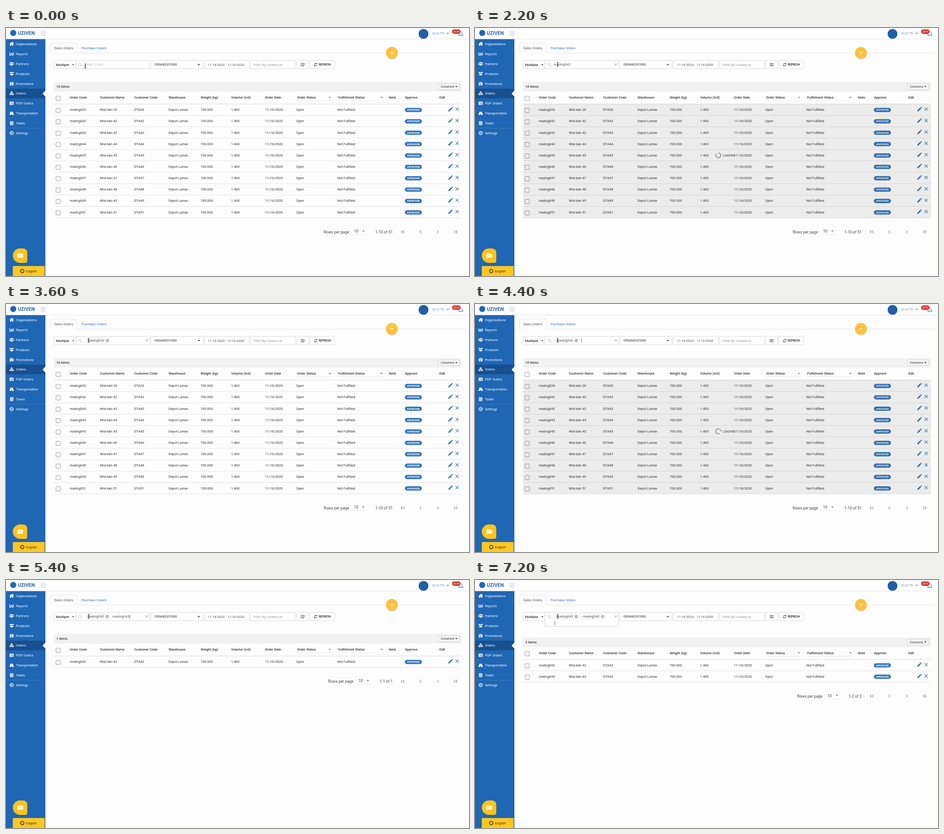
Animation of 1023 by 548 pixels, one loop 7400 ms. Source, as an HTML page:

```html
<!DOCTYPE html>
<html lang="en">
<head>
<meta charset="utf-8">
<title>Sales orders</title>
<style>
html, body { margin: 0; width: 100%; height: 100%; overflow: hidden; background: #fdfdfd; }
svg { display: block; width: 100%; height: 100%; }
text { font-family: Roboto, sans-serif; font-size: 7.46px; fill: #333; white-space: pre; }
</style>
</head>
<body>
<svg id="stage" viewBox="0 0 1023 548"></svg>
<script>
const LOOP = 7400, STEP = 200;
const BLUE = '#1f66b4', LINK = '#2f74b8', GREY = '#cfcfcf';
const stage = document.getElementById('stage');

const rect = (x, y, w, h, fill, extra = '') =>
  `<rect x="${x}" y="${y}" width="${w}" height="${h}" fill="${fill}" ${extra}/>`;
const box = (x, y, w, h, stroke = GREY, fill = '#fff', r = 1) =>
  rect(x, y, w, h, fill, `rx="${r}" stroke="${stroke}" stroke-width=".8"`);
const circle = (x, y, r, fill, extra = '') =>
  `<circle cx="${x}" cy="${y}" r="${r}" fill="${fill}" ${extra}/>`;
const line = (d, stroke, w = 1, extra = '') =>
  `<path d="${d}" fill="none" stroke="${stroke}" stroke-width="${w}" ${extra}/>`;
const shape = (d, fill) => `<path d="${d}" fill="${fill}"/>`;
const at = (x, y, body) => `<g transform="translate(${x} ${y})">${body}</g>`;
// y is the middle of the capital letters
const label = (x, y, s, { size = 7.46, weight = 400, fill = '#333', extra = '' } = {}) =>
  `<text x="${x}" y="${y + size * .36}" style="font-size:${size}px;font-weight:${weight};fill:${fill}" ${extra}>${s}</text>`;
const arrow = (x, y, fill = '#444') => shape(`M${x - 2.6} ${y - 1.3}h5.2l-2.6 2.7z`, fill);
const cross = (x, y, r, stroke, w) =>
  line(`M${x - r} ${y - r}l${2 * r} ${2 * r}M${x + r} ${y - r}l${-2 * r} ${2 * r}`, stroke, w);

const menu = [
  ['Organizations', shape('M-5 .4L0-4.2 5 .4 4.2 1.2 0-2.6-4.2 1.2zM-3.5 1L0-2 3.5 1V4.2H1V1.5H-1V4.2H-3.5zM2.3-4h1.4v3H2.3z', '#fff')],
  ['Reports', line('M-4.2-3.6V3.3H4.6', '#fff', 1.1) + line('M-2.2 2V-.3M-.2 2V-2.5M1.8 2V-1M3.8 2V-3.3', '#fff', 1.3)],
  ['Partners', circle(-3.2, -1.5, 1.3, '#fff') + circle(3.2, -1.5, 1.3, '#fff') + circle(0, -2, 1.8, '#fff') +
    shape('M-2.8 4V2Q-2.8.5 0 .5T2.8 2V4zM-5.4 2.2V1Q-5 0-3.1.2V2.2zM5.4 2.2V1Q5 0 3.1.2V2.2z', '#fff')],
  ['Products', shape('M-5-2.2L-3-4 0-2.8 3-4 5-2.2 2.6-.4 0-1.8-2.6-.4zM-3.7.6L-2.4 1 0-.6 2.4 1 3.7.6V2.6L0 4.3-3.7 2.6z', '#fff')],
  ['Promotions', shape('M-4.5-1.6H-.5V.8H-4.5zM.5-1.6H4.5V.8H.5zM-4 1.5H-.5V4.2H-4zM.5 1.5H4V4.2H.5z', '#fff') +
    line('M0-1.8C-4-2-2.5-5 0-2C2.5-5 4-2 0-1.8', '#fff', .9)],
  ['Orders', [[0, -2.2], [-2.5, 1.8], [2.5, 1.8]].map(([x, y]) =>
    shape(`M${x} ${y - 2.2}l2.2 1v2.3l-2.2 1.1-2.2-1.1v-2.3z`, '#fff') + line(`M${x - 1.6} ${y - .7}l1.6.7 1.6-.7M${x} ${y}v1.6`, '#17508f', .5)).join('')],
  ['PDP Orders', rect(-4.4, -3.6, 8.8, 7.2, '#fff', 'rx=".8"') +
    line('M-3-1.3h1M-1-1.3h4.3M-3 .4h1M-1 .4h4.3M-3 2.1h1M-1 2.1h4.3', BLUE, .8)],
  ['Transportation', shape('M-2.3-3.5H-.5V-1.8H.5V-3.5H2.3L5 3.6H.7V1.2H-.7V3.6H-5z', '#fff')],
  ['Tasks', rect(-3.8, -3.4, 7.6, 7.6, '#fff', 'rx=".8"') + line('M-2-4.6v2M2-4.6v2', '#fff', 1.1) +
    line('M-3.8-1.2h7.6', BLUE, .7) + line('M-2.6.6h5.2M-2.6 2.4h5.2', BLUE, 1.1, 'stroke-dasharray="1.2 .8"')],
  ['Settings', circle(0, 0, 3.4, 'none', 'stroke="#fff" stroke-width="1.1"') + circle(0, 0, 1.4, 'none', 'stroke="#fff" stroke-width=".9"') +
    circle(0, 0, 4.2, 'none', 'stroke="#fff" stroke-width="1" stroke-dasharray="1.6 1.7"')],
];

function sidebar() {
  return rect(0, 24, 87, 524, BLUE) + rect(0, 134, 87, 21.3, '#17508f') +
    shape('M87 138.5V151.5L80.7 145z', '#fdfdfd') + line('M0 221.3H87', '#4a86c8', .7) +
    menu.map(([name, icon], i) => {
      const y = 35 + i * 21.9;
      return at(12.5, y, icon) + label(22, y + .3, name, { fill: '#fff' });
    }).join('') +
    shape('M31 487C40 487 47 487 47 498V514Q47 519 42 519H31A16 16 0 0 1 31 487z', '#ffc31b') +
    shape('M26.5 498.2H36.5Q37.5 498.2 37.5 499.2V506.2Q37.5 507.2 36.5 507.2H28L25.5 509.7V499.2Q25.5 498.2 26.5 498.2z', '#fff') +
    line('M27.6 501h7.8M27.6 503.5h5.6', '#ffc31b', .9) +
    rect(15, 526, 70.5, 22, '#ffc71f') + circle(36, 537, 3.7, 'none', 'stroke="#222" stroke-width="1.5"') +
    label(44, 537.3, 'English');
}

function topbar() {
  return rect(0, 0, 1023, 24, '#fff') + line('M0 24.3H1023', '#dcdcdc', .8) +
    circle(16, 11, 6.7, BLUE) + label(26, 10.7, 'UZIVEN', { size: 10.8, weight: 700, fill: BLUE }) +
    line('M76.5 8.6h10.7M76.5 12.1h10.7M76.5 15.6h10.7', '#8db3dc', .9) +
    circle(922.5, 13, 10.8, '#1f5fa5') + label(941.5, 11.7, 'QLN/TB', { weight: 300, fill: LINK }) +
    line('M974 10.5l2.3 2.3 2.3-2.3', LINK, 1.1) +
    line('M1000.5 11.8V16.8H1009.3V11.8L1005 8.5zM1000.5 16.8L1005 13.4l4.3 3.4', LINK, .9) +
    rect(985.5, 3, 19, 10, '#d43a2f', 'rx="5"') +
    label(988.4, 8, '3974', { size: 5.8, fill: '#fff' });
}

const field = (x, w) => box(x, 71.7, w, 18.2);

function toolbar() {
  return line('M98 55.2H1017', '#ddd', .8) + shape('M98.4 55.8V33.6H157V55.8z', '#fdfdfd') +
    line('M98.4 55.2V33.6H157V55.2', '#ddd', .8) +
    label(106.5, 44.2, 'Sales Orders', { fill: '#555' }) + label(167, 44.2, 'Purchase Orders', { fill: LINK }) +
    circle(852.7, 56.3, 13.2, '#0002') + circle(852.7, 54.7, 13, '#ffc13b') +
    line('M849.2 54.7h7M852.7 51.2v7', '#fff', 1.2) +
    field(106, 49) + label(110.5, 81, 'Multiple', { size: 8, weight: 500 }) + arrow(148.5, 81.2) +
    field(320, 115.5) + label(328, 80.8, 'ORGANIZATIONS', { size: 6.4, weight: 500, fill: '#555' }) + arrow(426, 81, '#222') +
    field(438.7, 98.8) + label(445.8, 80.9, '11-16-2020 : 11-16-2020', { fill: '#555' }) +
    field(540.2, 99) + label(547, 80.9, 'Filter By Created At', { fill: '#999' }) +
    field(642.3, 26.5) + line('M652 78.5l2.3-.9 2.4.9 2.3-.9v5.8l-2.3.9-2.4-.9-2.3.9zM654.3 77.6v5.8M656.7 78.5v5.8', '#444', .8) +
    field(671.3, 54.5) + line('M681.6 80.2A2.8 2.8 0 0 1 686.6 79M686.9 81.6A2.8 2.8 0 0 1 681.9 82.8', '#222', 1) +
    shape('M687.6 77.3v2.7h-2.7zM680.9 84.5v-2.7h2.7z', '#222') +
    label(691, 80.8, 'REFRESH', { size: 6.4, weight: 500, fill: '#222' });
}

const INPUT = { extra: 'letter-spacing=".25"', fill: '#555' };
const chip = (x, s) => rect(x - 5, 74.2, 55.5, 12.8, '#fafafa', 'rx="6.4" stroke="#e4e4e4" stroke-width=".7"') +
  label(x, 80.4, s, { fill: '#555', extra: 'letter-spacing=".15"' }) +
  circle(x + 43.7, 80.8, 3.3, '#a6a6a6') + cross(x + 43.7, 80.8, 1.2, '#fff', .8);

function search({ chips, text, caret, shift }) {
  const x = 174 + (chips.length === 1 ? 61 : 0);
  let out = box(154.8, 71.7, 162.2, shift ? 30.8 : 18.2) +
    circle(163.4, 79.8, 2.7, 'none', 'stroke="#bbb" stroke-width=".9"') + line('M165.4 81.8l3 3', '#bbb', 1.1) +
    chips.map((s, i) => chip(180 + i * 58, s)).join('');
  if (text) out += label(x, 80.7, text, INPUT);
  else if (!chips.length) out += label(x, 80.7, 'Order Code...', { ...INPUT, fill: '#bbb' });
  if (text || chips.length) out += cross(311, 80.4, 2.4, '#777', .8);
  if (caret) out += line(`M${caret[0]} ${caret[1] - 4.3}v8.6`, '#333', .8);
  return out;
}

const codes = [26, 42, 43, 44, 45, 46, 47, 48, 49, 51];
const ROW = 25.15, TOP = 168;
const headers = [[141, 'Order Code'], [207.5, 'Customer Name'], [283, 'Customer Code'], [359, 'Warehouse'],
  [430, 'Weight (kg)'], [497.5, 'Volume (m3)'], [572, 'Order Date'], [643, 'Order Status'],
  [734, 'Fulfillment Status'], [846, 'Note'], [881.5, 'Approve'], [957.5, 'Edit']];
const checkbox = y => box(110.6, y - 4.7, 9.4, 9.4, '#777', '#fff', .8);

function row(code, i) {
  const y = TOP + ROW * i + 12.6;
  const cells = [[141, 'madng0' + code], [207.5, 'Nhà bán ' + code], [283, 'DTA' + code], [359, 'Depot Lumav'],
    [430, '700.000'], [497.5, '1.400'], [572, '11/16/2020'], [641, 'Open'], [732, 'Not Fulfilled']];
  return checkbox(y + 1.6) + cells.map(([x, s]) => label(x, y, s)).join('') +
    rect(881.3, y - 4.2, 37.6, 9.4, LINK, 'rx="4.7"') +
    label(900.1, y + .6, 'APPROVED', { size: 5.6, weight: 700, fill: '#fff', extra: 'text-anchor="middle"' }) +
    at(982, y - 1, shape('M-4.6 4.6V2.5L1.5-3.6 3.6-1.5-2.5 4.6zM2.1-4.2L3-5.1Q3.5-5.4 4-5L5-4Q5.4-3.5 5.1-3L4.2-2.1z', LINK)) +
    cross(996.8, y - 1.2, 3.3, LINK, 1.2) + line(`M106 ${TOP + ROW * (i + 1)}H1007.5`, '#dcdcdc', .8);
}

function pager(n, y) {
  const x = n < 10 ? 9.7 : 0;
  const big = { size: 8.5, fill: '#444' };
  return label(702 + x, y + .4, 'Rows per page', big) + label(769 + x, y - 1, '10', big) + arrow(789.8 + x, y - 1.6, '#666') +
    line(`M${762 + x} ${y + 6.2}h35`, '#ddd', .7) +
    label(854.3, y + .4, `1-${n} of ${n < 10 ? n : 51}`, { ...big, extra: 'text-anchor="end"' }) +
    line(`M874.3 ${y - 3.4}v6.8M880.3 ${y - 3.2}l-3.2 3.2 3.2 3.2M917.3 ${y - 3.2}l-3.2 3.2 3.2 3.2` +
      `M952.7 ${y - 3.2}l3.2 3.2-3.2 3.2M989.7 ${y - 3.2}l3.2 3.2-3.2 3.2M995.8 ${y - 3.4}v6.8`, '#555', 1);
}

function table({ rows, shift, load }, t) {
  const n = rows.length, bottom = TOP + ROW * n, mid = (143 + bottom) / 2;
  let out = rect(106, 119.5, 901.5, 21, '#f1f1f1') + label(111.3, 129.8, n + ' items', { weight: 500 }) +
    box(955, 123, 47, 13.4, '#ccc', '#f5f5f5') + label(960.5, 129.7, 'Columns') + arrow(995, 129.7, '#222') +
    checkbox(155.5) + headers.map(([x, s]) => label(x, 153.7, s, { weight: 500 })).join('') +
    arrow(715.6, 153.7, '#666') + arrow(829.5, 153.7, '#666') + line('M642 161h80M733 161h102', '#e0e0e0', .7) +
    line(`M106 ${TOP}H1007.5`, '#d5d5d5', .9) + rows.map(row).join('') + pager(n, bottom + 30.8);
  if (load) {
    out += rect(106, TOP, 901.5, bottom - TOP, '#000', 'opacity=".065"') +
      `<g transform="translate(537.5 ${mid}) rotate(${(t - load) * .36})">` +
      line('M0-5.5A5.5 5.5 0 1 1-4.5-3.2', '#555', 1.1) + '</g>' +
      label(547, mid, 'LOADING', { size: 6.4, extra: 'letter-spacing=".15"' });
  }
  return at(0, shift, out);
}

const pointer = ([x, y]) =>
  line(`M${x - 2} ${y - 4.8}q2 0 2 1v7.6q0 1 2 1M${x + 2} ${y - 4.8}q-2 0-2 1v7.6q0 1-2 1`, '#111', .8);

// each entry changes part of the state from its time on
const steps = [
  [0, { rows: codes, shift: 0, load: 0, chips: [], text: '', caret: null, mouse: [175, 84] }],
  [200, { mouse: [175, 82.7] }],
  [1200, { caret: [174.5, 80.7] }],
  [1600, { text: 'madng042', caret: null }],
  [2200, { load: 2200, mouse: [182.7, 80.3] }],
  [3400, { load: 0, text: '', chips: ['madng042'] }],
  [3800, { caret: [235.3, 80.7] }],
  [4000, { load: 4000 }],
  [4600, { load: 0, rows: [42] }],
  [4800, { text: 'madng042', caret: [273.3, 80.7] }],
  [5200, { text: 'madng04', caret: [268.8, 80.7] }],
  [5400, { text: 'madng043', caret: [273.3, 80.7] }],
  [5800, { text: '', chips: ['madng042', 'madng043'], shift: 7.5, caret: [176.7, 95] }],
  [6400, { load: 6400, caret: null }],
  [7000, { load: 0, rows: [42, 43] }],
  [7200, { caret: [176.7, 95] }],
];

stage.innerHTML = rect(0, 0, 1023, 548, '#fdfdfd') + sidebar() + topbar() + toolbar() + '<g id="live"></g>';
const live = document.getElementById('live');
let shown = -1;

function draw(now) {
  const t = Math.floor(now % LOOP / STEP) * STEP;
  if (t !== shown) {
    shown = t;
    const state = Object.assign({}, ...steps.filter(([from]) => from <= t).map(([, change]) => change));
    live.innerHTML = table(state, t) + search(state) + pointer(state.mouse);
  }
  requestAnimationFrame(() => draw(performance.now() - start));
}
const start = performance.now();
draw(0);
</script>
</body>
</html>
```
